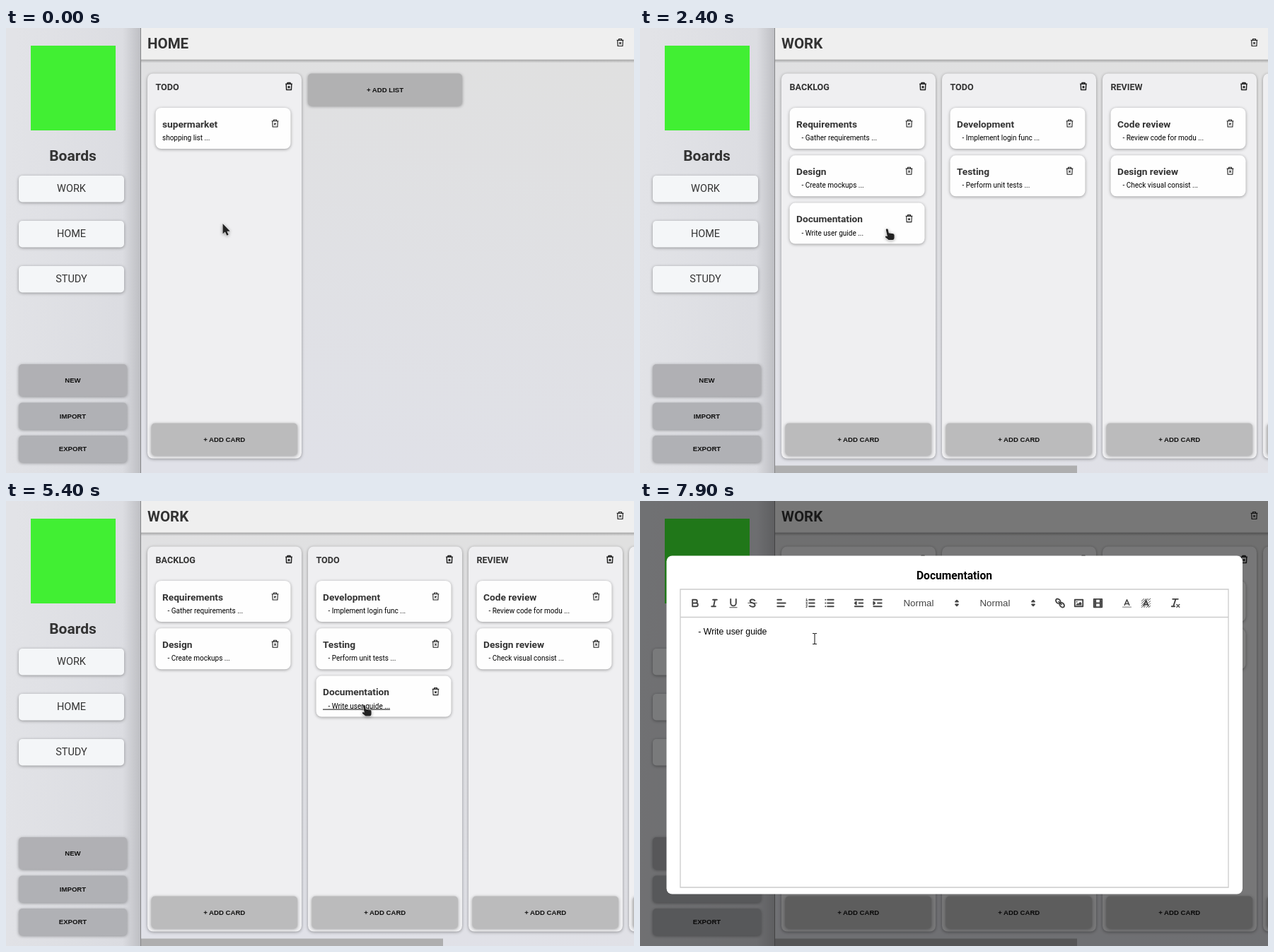
An HTML page for the animation above (8000 ms loop, 888 px wide and 630 px high).

```html
<!DOCTYPE html>
<html lang="en">
<head>
<meta charset="utf-8">
<title>Kanban board</title>
<style>
html, body { margin: 0; width: 100%; height: 100%; overflow: hidden; }
svg { display: block; width: 100vw; height: 100vh; }
text { font-family: Roboto, sans-serif; fill: #333; }
.b { font-weight: 700; }
.mid { text-anchor: middle; }
.head { font-size: 20.5px; }
.list { font-size: 12.6px; }
.title { font-size: 13.7px; }
.desc { font-size: 10px; fill: #000; }
.under .desc { text-decoration: underline; }
.nav { font-size: 14.5px; }
.btn { font: 700 9.6px "Liberation Sans", Arial, sans-serif; fill: #111; }
.ed { font: 12.35px "Liberation Sans", Arial, sans-serif; fill: #000; }
.pick { font-size: 13.3px; fill: #444; }
.sh { filter: drop-shadow(0 1px 2px rgba(0,0,0,.36)); }
.line { fill: none; stroke: #444; stroke-linecap: round; stroke-linejoin: round; stroke-width: 2; }
.thin { stroke-width: 1; }
.solid { fill: #444; }
</style>
</head>
<body>
<svg id="stage" viewBox="0 0 888 630" preserveAspectRatio="none">
  <defs>
    <linearGradient id="main" x1="0.7" y1="0" x2="0.4" y2="1">
      <stop offset="0" stop-color="#e0e0e0"/><stop offset="1" stop-color="#e0e1e8"/>
    </linearGradient>
    <linearGradient id="side" x1="0" y1="0.4" x2="1" y2="0.6">
      <stop offset="0" stop-color="#e2e3e7"/><stop offset="1" stop-color="#dadbe0"/>
    </linearGradient>
    <linearGradient id="edge">
      <stop offset="0" stop-color="#000" stop-opacity="0"/><stop offset="1" stop-color="#000" stop-opacity=".13"/>
    </linearGradient>
    <linearGradient id="drop" x2="0" y2="1">
      <stop offset="0" stop-color="#000" stop-opacity=".28"/><stop offset="1" stop-color="#000" stop-opacity="0"/>
    </linearGradient>
  </defs>
</svg>
<script>
const NB = "\u00a0";
const PITCH = 227, CARD_W = 191, CARD_H = 58;
const stage = document.getElementById("stage");

const rect = (x, y, w, h, r, fill, more = "") =>
  `<rect x="${x}" y="${y}" width="${w}" height="${h}" rx="${r}" fill="${fill}" ${more}/>`;
const text = (x, y, cls, s) => `<text x="${x}" y="${y}" class="${cls}">${s}</text>`;
const group = (id, body, more = "") => `<g id="${id}" ${more}>${body}</g>`;

const trash = (x, y, w) =>
  `<path transform="translate(${x} ${y})" fill="none" stroke="#222" stroke-width="${w}" stroke-linejoin="round"
    d="M-4.8-3.2H4.8M-2-3.2V-5H2V-3.2M-3.8-3.2L-3.4 5H3.4L3.8-3.2M-1.3-.3L1.3 2.4M1.3-.3L-1.3 2.4"/>`;

const button = (x, y, w, h, fill, label) =>
  rect(x, y, w, h, 5, fill, 'class="sh"') + text(x + w / 2, y + h / 2 + 3.4, "btn mid", label);

const navButton = (y, label) =>
  rect(18, y, 149, 37.5, 5, "#f4f6f8", 'class="sh"') + text(92.5, y + 23, "nav mid", label);

const cardBody = (title, desc) =>
  rect(0, 0, CARD_W, CARD_H, 8, "#fefefe", 'class="sh"') +
  text(9.5, 27.7, "title b", title) + text(9.5, 46, "desc", desc) + trash(169, 22, 1.1);

const cardAt = (col, row) => [211.5 + col * PITCH, 113 + row * 67.3];
const card = (col, row, title, desc) =>
  `<g transform="translate(${cardAt(col, row)})">${cardBody(title, desc)}</g>`;
const task = s => NB.repeat(3) + "- " + s + " ...";

function list(col, name) {
  const x = 200 + col * PITCH;
  return rect(x, 64.5, 218, 545, 8, "#efeff1", 'class="sh"') +
    text(x + 11.5, 88, "list b", name) + trash(x + 200, 82.5, 1.5) +
    button(x + 5.5, 559.5, 206.5, 45.5, "#bbbbbc", "+ ADD CARD");
}

const header = name => text(200, 28.7, "head b", name);

const sidebar =
  rect(0, 0, 190, 630, 0, "url(#side)") + rect(165, 0, 25, 630, 0, "url(#edge)") +
  rect(190, 0, 1, 630, 0, "#858587") +
  rect(35, 25, 120, 120, 0, "#41ef33") +
  text(94.5, 188, "b mid", "Boards").replace("<text", '<text font-size="21"') +
  group("work", navButton(209, "WORK")) +
  group("workHover", rect(15, 208, 155, 39, 6, "#fff", 'class="sh"') +
    text(92.5, 232.5, "b mid", "WORK").replace("<text", '<text font-size="15.8"')) +
  navButton(273, "HOME") + navButton(337, "STUDY") +
  button(18, 476, 153, 45.5, "#b0b0b4", "NEW") +
  button(18, 530.5, 153, 38, "#b0b1b5", "IMPORT") +
  button(18, 577, 153, 38, "#b0b1b5", "EXPORT");

const home = header("HOME") + list(0, "TODO") +
  card(0, 0, "supermarket", "shopping list ...") +
  button(427, 64.5, 218, 45.5, "#b1b1b2", "+ ADD LIST");

const doc = cardBody("Documentation", task("Write user guide"));
const work = header("WORK") +
  list(0, "BACKLOG") + list(1, "TODO") + list(2, "REVIEW") + list(3, "DONE") +
  card(0, 0, "Requirements", task("Gather requirements")) +
  card(0, 1, "Design", task("Create mockups")) +
  card(1, 0, "Development", task("Implement login func")) +
  card(1, 1, "Testing", task("Perform unit tests")) +
  card(2, 0, "Code review", task("Review code for modu")) +
  card(2, 1, "Design review", task("Check visual consist")) +
  group("doc", doc) +
  rect(190, 619.5, 428, 10.5, 0, "#aeaeaf");

// Toolbar icons live on an 18 unit grid.
const icon = (x, body) => `<g transform="translate(${x - 8.55} 136) scale(.95)">${body}</g>`;
const line = (d, cls = "") => `<path class="line ${cls}" d="${d}"/>`;
const picker = x => text(x, 149.3, "ed pick", "Normal") +
  icon(x + 75.5, line("M7 11L9 13L11 11ZM7 7L9 5L11 7Z", "solid"));
const rows = x => line(`M${x} 4H15M${x} 9H15M${x} 14H15`);

const toolbar =
  icon(78, line("M5 4H9.5A2.5 2.5 0 0 1 9.5 9H5ZM5 9H10.5A2.5 2.5 0 0 1 10.5 14H5Z")) +
  icon(105, line("M7 4H13M5 14H11M8 14L10 4")) +
  icon(132, line("M5 3V9A4 4 0 0 0 13 9V3") + rect(3, 15, 12, 1, .5, "#444")) +
  icon(159, line("M12.5 5.2C11 3 5.5 3 5.5 6C5.5 8 8 8.3 9.5 8.8C11.5 9.4 12.8 10 12.8 12C12.8 15 7 15.2 5 12.6") +
    line("M2.5 8.8H15.5", "thin")) +
  icon(200, line("M3 4H9M3 9H15M3 14H13")) +
  icon(241, rows(7) + line("M2.6 3L3.5 2.5V5.5M2.5 5.5H4.5M2.5 8H4.3L2.5 10.5H4.5M2.5 12.5H4.3L3.4 13.8Q5 15.5 2.5 15.4", "thin")) +
  icon(268, rows(6) + line("M3 4H3M3 9H3M3 14H3")) +
  icon(309.5, line("M3 4H15M9 9H15M3 14H15") + line("M5 7V11L3 9Z", "solid")) +
  icon(336, line("M3 4H15M9 9H15M3 14H15") + line("M3 7V11L5 9Z", "solid")) +
  picker(372.5) + picker(480.5) +
  icon(594, line("M7 7L11 11") +
    [6.2, 11.8].map(c => `<ellipse class="line" cx="${c}" cy="${c}" rx="4" ry="2.9" transform="rotate(45 ${c} ${c})"/>`).join("")) +
  icon(620.5, line("M3 4H15V14H3Z") + `<circle class="solid" cx="6" cy="7" r="1"/>` +
    `<path class="solid" d="M5 12V11L7 9L8 10L11 7L13 9V12Z"/>`) +
  icon(647.5, line("M3 3H15V15H3Z") + line("M5.5 3V15M12.5 3V15M5.5 9H12.5M3 6H5M3 9H5M3 12H5M13 6H15M13 9H15M13 12H15")) +
  icon(688.5, line("M5.5 12L9 4L12.5 12M6.4 10H11.6", "thin").replace("d=", 'style="stroke-width:1.6" d=') +
    line("M3 15H15").replace("d=", 'opacity=".4" d=')) +
  icon(715.5, line("M2.5 6L6 2.5M2.5 9.5L9 2.5M2.5 13L6 9M9 4.5L12 2.5M12 5L15.5 2.5M13 8L15.5 6M14 11L15.5 9.5M2.5 15.5L4 14M6 15.5L8 13.5M9.5 15.5L12 13.5M13 15.5L15.5 13", "thin") +
    line("M5.5 13L9 5L12.5 13M6.4 11H11.6")) +
  icon(757, line("M5 3H13M6 14L9.5 3M3.5 14H8") + line("M11 11L15 15M15 11L11 15").replace("d=", 'style="stroke-width:1.5" d='));

const modal = rect(0, 0, 888, 630, 0, "#000", 'opacity=".5"') +
  rect(37.5, 77.5, 814.5, 479, 8, "#fff") +
  text(444.5, 111, "b mid", "Documentation").replace("<text", '<text font-size="15.6" style="fill:#000"') +
  `<path d="M57 125H832V547H57ZM57 164.5H832" fill="none" stroke="#ccc" stroke-width="1.3"/>` +
  toolbar + text(72, 188.7, "ed", NB.repeat(3) + "- Write user guide") +
  rect(72, 177, 1, 15, 0, "#000", 'id="caret"');

const outline = 'fill="#222" stroke="#fff" stroke-width="1" stroke-linejoin="round" paint-order="stroke"';
const cursors =
  group("arrow", `<path class="sh" ${outline} d="M0 0V14.5L3.3 11.6L5.7 16.8L8.2 15.7L5.9 10.7H10.3Z"/>`) +
  group("hand", `<path class="sh" ${outline} d="M-1.3 1.2Q0-.8 1.6 1L2.8 6.2L9 7.2Q10.6 7.6 10.6 9.5V13Q10.4 16 8 16H2.5L-2 12.2Q-2.8 10.8-1 10.6L.8 11Z"/>`) +
  group("fist", `<path ${outline} d="M-6-.8Q-6.2-2.2-4.5-2.2Q-4-4.6-1.8-4.3Q0-5.4 1.5-4.3Q5.6-4.4 5.8-1.5V2.5Q5.4 7 2 7H-2Q-4-.1-6-.8Z"/>` +
    `<circle cx="7.6" cy="9.6" r="4.4" fill="#111" stroke="#fff" stroke-width=".7"/>` +
    `<path d="M5.2 9.6H10M7.6 7.2V12" stroke="#fff" stroke-width="1.3"/>`) +
  group("beam", `<path d="M-3-7.5H-1Q0-7.5 0-6.5V6.5Q0 7.5-1 7.5H-3M3-7.5H1Q0-7.5 0-6.5M0 6.5Q0 7.5 1 7.5H3" fill="none" stroke="#222" stroke-width="1.1"/>`);

stage.insertAdjacentHTML("beforeend",
  rect(0, 0, 888, 630, 0, "url(#main)") +
  rect(190, 44.5, 698, 5, 0, "url(#drop)") + rect(190, 0, 698, 44.5, 0, "#efefef") +
  trash(868.5, 20.5, 1.2) +
  group("homeBoard", home) + group("workBoard", work) + sidebar +
  group("ghost", doc, 'class="under" opacity=".7"') +
  group("modal", modal) + cursors);

const el = id => document.getElementById(id);
const show = (id, on) => el(id).setAttribute("display", on ? "inline" : "none");
const move = (id, x, y) => el(id).setAttribute("transform", `translate(${x} ${y})`);

// Pointer moves: start, end, target, optional curve control point.
const START = [306.5, 277];
const MOVES = [
  [200, 900, [104, 231]],
  [1900, 2400, [349, 284]],
  [3300, 3700, [362, 312]],
  [3700, 3800, [406, 318]],
  [3800, 3900, [534, 321]],
  [3900, 4200, [539, 322]],
  [4200, 4600, [573, 312]],
  [4900, 5400, [506, 288.5]],
  [6100, 6800, [246, 203.5], [440, 370]],
  [6900, 7000, [247, 195]],
];

function pointer(t) {
  let from = START;
  for (const [t0, t1, to, ctrl] of MOVES) {
    if (t <= t0) break;
    if (t < t1) {
      const k = (t - t0) / (t1 - t0), p = k * k * (3 - 2 * k), q = 1 - p;
      return from.map((a, i) => {
        const c = ctrl ? ctrl[i] : (a + to[i]) / 2;
        return q * q * a + 2 * p * q * c + p * p * to[i];
      });
    }
    from = to;
  }
  return from;
}

const inside = ([x, y], l, t, w, h) => x >= l && x < l + w && y >= t && y < t + h;

function draw(ms) {
  const t = Math.floor(ms / 100) * 100;
  const p = pointer(t);
  const onWork = t >= 1300, open = t >= 5800;
  const drag = t >= 3500 && t < 4300, ghost = t >= 3600 && t < 4300;
  const docPos = cardAt(t >= 4300 ? 1 : 0, 2);

  show("homeBoard", !onWork);
  show("workBoard", onWork);
  const hover = !open && inside(p, 18, 209, 149, 38);
  show("work", !hover);
  show("workHover", hover);

  move("doc", ...docPos);
  const onDoc = onWork && inside(p, ...docPos, CARD_W, CARD_H);
  const onDesc = onDoc && p[1] > 285.5 && p[1] < 298;
  el("doc").setAttribute("class", drag || onDesc ? "under" : "");
  show("ghost", ghost);
  const g = pointer(t - 100);
  move("ghost", g[0] - 137, g[1] - 36);

  show("modal", open);
  const caret = t >= 5900 && t < 6500 || t >= 7000 && t < 7900;
  show("caret", caret);
  el("caret").setAttribute("y", t >= 7300 ? 194 : 177);

  const overNav = [209, 273, 337].some(y => inside(p, 18, y, 149, 38));
  const kind = t >= 6200 ? "beam" : drag ? "fist" : open || overNav || onDoc ? "hand" : "arrow";
  for (const id of ["arrow", "hand", "fist", "beam"]) show(id, id === kind);
  move(kind, ...p);
}

const begin = performance.now();
function tick() {
  draw((performance.now() - begin) % 8000);
  requestAnimationFrame(tick);
}
tick();
</script>
</body>
</html>
```
